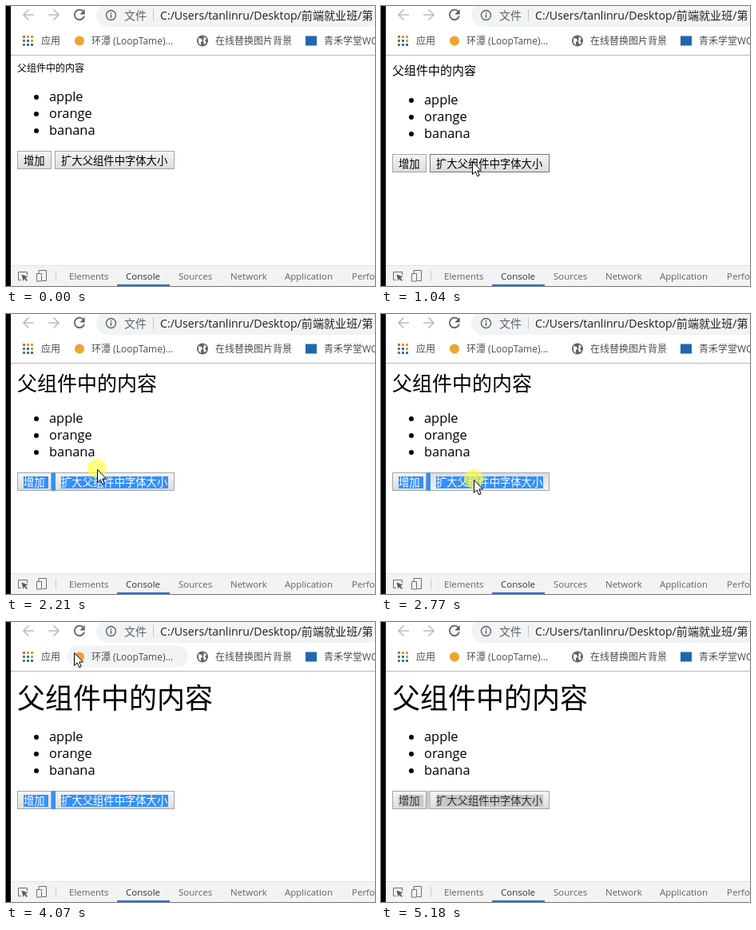
These frames come from a looping animation (462 by 350 pixels, 5310 ms). An HTML page:

```html
<!DOCTYPE html>
<html lang="zh-CN">
<head>
<meta charset="utf-8">
<title>父组件中的内容</title>
<style>
  html, body { margin: 0; width: 100%; height: 100%; overflow: hidden; background: #fff; }
  svg { display: block; width: 100vw; height: 100vh; }
  text { font-family: "Open Sans", "Noto Sans CJK SC", "Noto Sans CJK JP", sans-serif; white-space: pre; }
  .bookmark { font-size: 12px; fill: #4b4e52; }
  .tab { font-size: 11.5px; fill: #5f6368; }
  .item { font-size: 16.4px; }
  .label { font-size: 13.333px; }
</style>
</head>
<body>
<svg viewBox="0 0 462 350">
  <defs>
    <linearGradient id="raised" x2="0" y2="1"><stop stop-color="#f5f5f5"/><stop offset="1" stop-color="#dcdcdc"/></linearGradient>
    <linearGradient id="pressed" x2="0" y2="1"><stop stop-color="#dcdcdc"/><stop offset="1" stop-color="#f3f3f3"/></linearGradient>
  </defs>
  <rect width="462" height="350" fill="#fff"/>

  <g id="toolbar">
    <g fill="none" stroke="#babcbe" stroke-width="1.6">
      <path d="M35 11H22M28.5 4.5L22 11l6.5 6.5"/>
      <path d="M53 11h13M59.5 4.5L66 11l-6.5 6.5"/>
    </g>
    <path d="M97 7.2A6.2 6.2 0 1 0 98 12.6" fill="none" stroke="#5f6368" stroke-width="1.8"/>
    <path d="M98.7 4v6.4h-6.4z" fill="#5f6368"/>
    <path d="M470-4H128a15 15 0 0 0 0 30h342z" fill="#f1f3f4"/>
    <circle cx="131.5" cy="11.5" r="6" fill="none" stroke="#5f6368" stroke-width="1.4"/>
    <path d="M131.5 10.6v4.2M131.5 7.9v1.6" stroke="#5f6368" stroke-width="1.5"/>
    <text x="148" y="16.8" font-size="14" fill="#5f6368">文件</text>
    <path d="M184.5 4v15" stroke="#c2c5c9"/>
    <text x="193" y="16.8" font-size="14.1" fill="#202124">C:/Users/tanlinru/Desktop/前端就业班/第</text>
  </g>

  <g id="bookmarks">
    <rect id="pill" x="77" y="29.5" width="151" height="27" rx="13.5" fill="#f1f3f4"/>
    <g id="apps"></g>
    <circle cx="92" cy="43.5" r="6" fill="#f0a42e"/>
    <circle cx="246" cy="43.5" r="7" fill="#5f6368"/>
    <path d="M241 40l4 1 1 3-2 1v4l-3-3zM248 38l3 3-2 2 2 3-3 2-1-4z" fill="#fff"/>
    <rect x="375" y="37.5" width="14" height="12" fill="#2267ae"/>
    <text class="bookmark" x="44" y="48">应用</text>
    <text class="bookmark" x="107" y="48">环潭 (LoopTame)...</text>
    <text class="bookmark" x="262" y="48">在线替换图片背景</text>
    <text class="bookmark" x="398" y="48">青禾学堂WQ</text>
    <path d="M6 61.5h456" stroke="#b8b8b8"/>
  </g>

  <text id="heading" x="14"></text>
  <g id="flow">
    <g id="list"></g>
    <g id="buttons"></g>
  </g>

  <g id="devtools">
    <rect y="324" width="462" height="26" fill="#f3f3f3"/>
    <path d="M6 324.5h456" stroke="#e4e4e4"/>
    <g fill="none" stroke="#6e6e6e">
      <path d="M19 342.5h-3.5v-10h11v4"/>
      <path d="M41 334v-3.5h9.5v13h-5M38.5 334.5h6v9.500h-6z"/>
    </g>
    <path d="M19.5 335.5l8 3-3.2 1.300 2.700 2.900-1.200 1.200-2.800-2.800-1.400 3z" fill="#5a5a5a"/>
    <path d="M62.5 331v13" stroke="#ccc"/>
    <g id="tabs"></g>
    <rect x="139" y="348" width="66" height="2" fill="#1a73e8"/>
  </g>

  <circle id="glow" r="12" fill="#ffff3c" opacity=".65"/>
  <path id="cursor" d="M.5.5V16.500L4.200 13 6.700 18.800 9.200 17.700 6.700 12H11.500z" fill="#fff" stroke="#000"/>
  <rect width="6" height="350" fill="#000"/>
</svg>

<script>
const LOOP = 5310;
const byId = id => document.getElementById(id);

function add(parent, tag, attrs, text = "") {
  const node = document.createElementNS("http://www.w3.org/2000/svg", tag);
  set(node, attrs);
  node.textContent = text;
  return parent.appendChild(node);
}
function set(node, attrs) {
  for (const key in attrs) node.setAttribute(key, attrs[key]);
}
const show = (node, on) => set(node, { visibility: on ? "visible" : "hidden" });

// Static repeats
const [red, amber, green, blue] = ["#e0652f", "#e0982f", "#5a8a4a", "#2f6fc0"];
[red, amber, amber, green, blue, amber, green, blue, blue].forEach((fill, i) =>
  add(byId("apps"), "rect", { x: 21 + i % 3 * 5, y: 37 + Math.floor(i / 3) * 5, width: 3, height: 3, fill }));

["apple", "orange", "banana"].forEach((name, i) => {
  add(byId("list"), "circle", { cx: 38, cy: 114 + i * 21, r: 3 });
  add(byId("list"), "text", { class: "item", x: 54, y: 119 + i * 21 }, name);
});

[["Elements", 79], ["Console", 150], ["Sources", 216], ["Network", 281], ["Application", 349], ["Performance", 433]]
  .forEach(([name, x]) => {
    const tab = add(byId("tabs"), "text", { class: "tab", x, y: 342 }, name);
    if (name === "Console") tab.style.fill = "#333";
  });

function makeButton(x, width, label, markWidth) {
  const group = byId("buttons");
  return {
    box: add(group, "rect", { x: x + .5, y: 181.5, width: width - 1, height: 22 }),
    mark: add(group, "rect", { x: x + 8, y: 186, width: markWidth, height: 15 }),
    label: add(group, "text", { class: "label", x: x + 8, y: 198 }, label)
  };
}
const addButton = makeButton(14, 43, "增加", 31);
const growButton = makeButton(61, 150, "扩大父组件中字体大小", 134);
const gapMark = add(byId("buttons"), "rect", { x: 57, y: 181, width: 5, height: 23, rx: 1 });
byId("heading").textContent = "父组件中的内容";

// start time, heading size, heading baseline, shift of the content below
const layouts = [
  [0, 12, 82, 0], [1040, 15, 85.5, 4], [1530, 20, 90.5, 10],
  [1890, 25, 96.2, 17], [2880, 30, 102.2, 24], [3580, 35, 107.8, 30]
];
const presses = [[930, 1040], [1410, 1530], [1780, 1890], [2210, 2270], [2770, 2880], [3450, 3580]];
const visible = [[180, 4260], [4370, 5000]];

// first step, last step, step count, end point
const moves = [
  [180, 180, 1, 397, 335], [240, 540, 6, 118, 182], [720, 840, 3, 114, 194],
  [2590, 2710, 3, 116, 207], [3330, 3390, 2, 117, 218],
  [3760, 4070, 6, 85, 38], [4140, 4200, 2, 89, 4], [4370, 4370, 1, 90, 14],
  [4570, 4914, 5, 397, 335]
];

const during = (ranges, t) => ranges.some(([a, b]) => t >= a && t < b);

function pointerAt(t) {
  let x = 397, y = 335;
  for (const [first, last, count, endX, endY] of moves) {
    if (t < first) break;
    const gap = (last - first) / (count - 1 || 1);
    const step = gap ? Math.min(count, Math.floor((t - first) / gap + 1e-6) + 1) : 1;
    const p = step / count, eased = p * p * (3 - 2 * p);
    x += (endX - x) * eased;
    y += (endY - y) * eased;
  }
  return [Math.round(x), Math.round(y)];
}

function styleButton(button, hovered, held, selection) {
  set(button.box, {
    fill: `url(#${hovered && held ? "pressed" : "raised"})`,
    stroke: hovered && !held ? "#747474" : "#a6a6a6"
  });
  set(button.mark, { fill: selection });
  set(button.label, { fill: selection === "none" ? "#000" : selection === "#c8c8c8" ? "#323232" : "#fff" });
}

function render(t) {
  const [, size, baseline, shift] = layouts.filter(l => l[0] <= t).pop();
  set(byId("heading"), { "font-size": size, y: baseline });
  set(byId("flow"), { transform: `translate(0 ${shift})` });

  const [x, y] = pointerAt(t);
  const present = during(visible, t), held = during(presses, t);
  const inside = (left, top, right, bottom) => present && x >= left && x < right && y >= top && y < bottom;
  const rowHover = (left, right) => inside(left, 181 + shift, right, 204 + shift);

  const selection = t < 2210 ? "none" : t < 5180 ? "#3390ff" : "#c8c8c8";
  styleButton(addButton, rowHover(14, 57), held, selection);
  styleButton(growButton, rowHover(61, 211), held, selection);
  set(gapMark, { fill: selection });

  show(byId("pill"), inside(77, 30, 228, 57));
  show(byId("glow"), held);
  show(byId("cursor"), present);
  set(byId("glow"), { cx: x, cy: y - 1 });
  set(byId("cursor"), { transform: `translate(${x} ${y})` });
}

function tick() {
  render(performance.now() % LOOP);
  requestAnimationFrame(tick);
}
tick();
</script>
</body>
</html>
```
